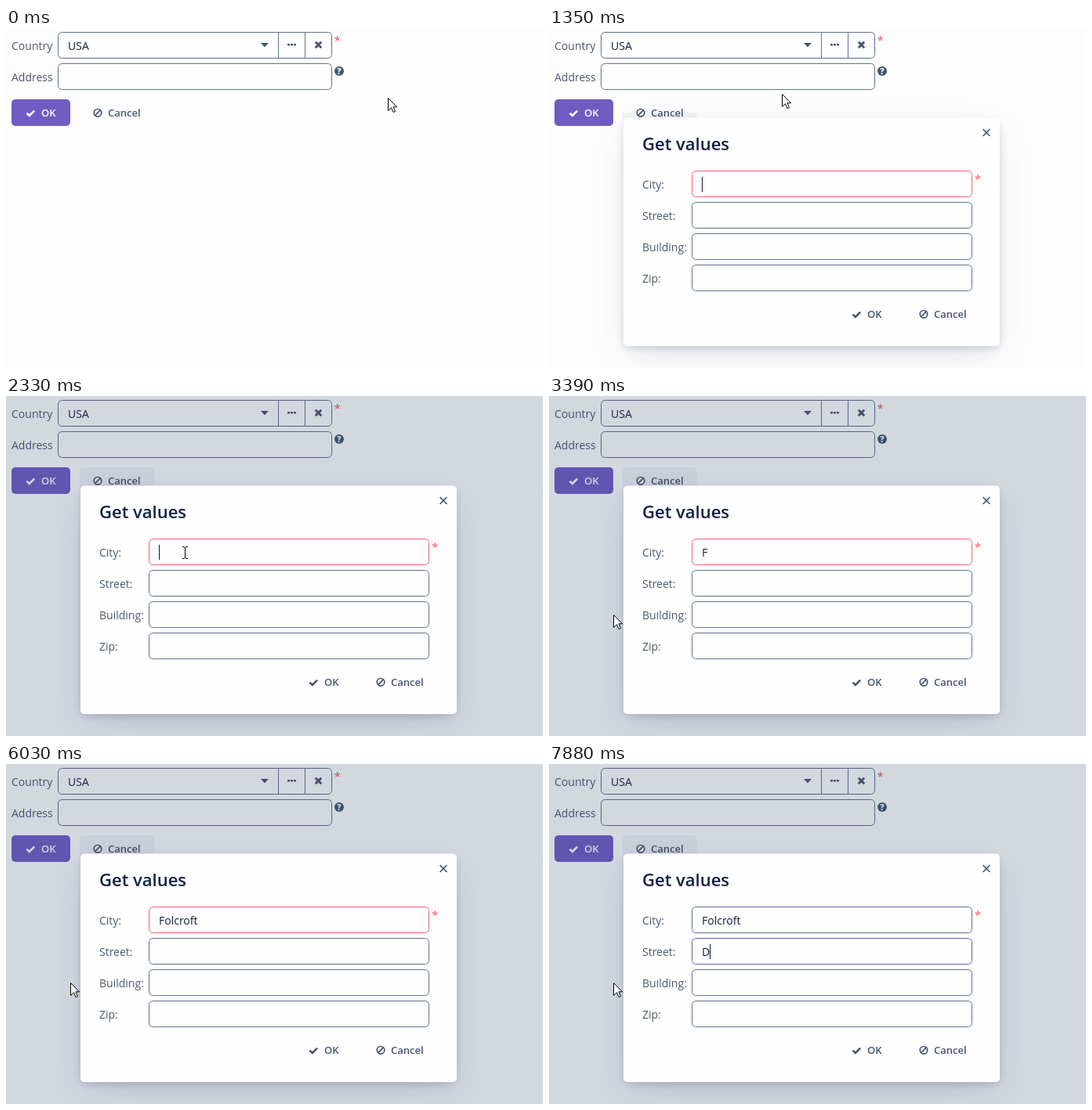
These frames come from a looping animation (685 px wide and 434 px high, 8 s). An HTML page with a canvas:

```html
<!DOCTYPE html>
<html lang="en">
<head>
<meta charset="utf-8">
<title>Address form</title>
<style>
  html, body { margin: 0; width: 100%; height: 100%; overflow: hidden; background: #fdfdfd; }
  canvas { display: block; }
</style>
</head>
<body>
<canvas id="stage" width="685" height="434"></canvas>
<script>
const ctx = document.getElementById('stage').getContext('2d');
const LOOP = 8000;
const FONT = '"Open Sans", sans-serif';
const PAPER = '#fdfdfd', LABEL = '#4b5872', INK = '#0d1c38', ICON = '#465472';
const BORDER = '#5f7091', ERROR = '#f8616d', ACCENT = '#6d58c2', STAR = '#ef5448';

// [time, x, y, shape]
const pointer = [
  [0, 487, 89, 'arrow'], [130, 482, 87, 'arrow'], [260, 467, 79, 'arrow'],
  [390, 449, 69, 'arrow'], [520, 434, 62, 'arrow'], [650, 421, 58, 'hand'],
  [1070, 419, 57, 'hand'], [1210, 326, 88, 'arrow'], [1350, 297, 84, 'arrow'],
  [1510, 260, 101, 'arrow'], [1650, 236, 154, 'arrow'], [1790, 228, 200, 'beam'],
  [2600, 168, 227, 'arrow'], [2730, 104, 266, 'arrow'], [2860, 82, 279, 'arrow']
];

// [time, city letters typed]
const cityTyping = [[0, 0], [3390, 1], [3660, 2], [4050, 3], [4580, 4],
  [5110, 5], [5500, 6], [5760, 7], [6030, 8]];

// The caret flips between hidden and shown at each of these times.
const caretFlips = [1350, 1790, 2330, 2860, 3660, 3920, 4050, 4450, 4580, 4980,
  5110, 5370, 5500, 6030, 6560, 7490, 7880];

const backdrop = [[0, 0], [1510, 0.155], [1650, 0.185], [1790, 0.193]];

function latest(steps, t) {
  let current = steps[0];
  for (const step of steps) if (step[0] <= t) current = step;
  return current;
}

function text(str, x, y, color = LABEL, size = 14, weight = 400) {
  ctx.font = `${weight} ${size}px ${FONT}`;
  ctx.fillStyle = color;
  ctx.fillText(str, x, y);
}

function box(x, y, w, h, r, fill) {
  ctx.beginPath();
  ctx.roundRect(x, y, w, h, r);
  ctx.fillStyle = fill;
  ctx.fill();
}

function line(points, color, width) {
  ctx.beginPath();
  points.forEach(([x, y]) => ctx.lineTo(x, y));
  ctx.strokeStyle = color;
  ctx.lineWidth = width;
  ctx.stroke();
}

function cross(x, y, r, color, width) {
  line([[x - r, y - r], [x + r, y + r]], color, width);
  line([[x - r, y + r], [x + r, y - r]], color, width);
}

function field(x, y, w, color = BORDER) {
  ctx.beginPath();
  ctx.roundRect(x + 0.5, y + 0.5, w - 1, 33, 5);
  ctx.fillStyle = '#fefefe';
  ctx.fill();
  ctx.strokeStyle = color;
  ctx.lineWidth = 1;
  ctx.stroke();
}

function check(x, y, color) {
  line([[x + 1, y + 4.7], [x + 4.3, y + 8], [x + 10.6, y + 1.7]], color, 2.6);
}

function ban(x, y) {
  ctx.beginPath();
  ctx.arc(x, y, 4.8, 0, Math.PI * 2);
  ctx.strokeStyle = ICON;
  ctx.lineWidth = 1.7;
  ctx.stroke();
  line([[x - 3.4, y + 3.4], [x + 3.4, y - 3.4]], ICON, 1.7);
}

function buttonText(str, x, y, color = ICON) {
  text(str, x, y, color, 13, 600);
}

function drawForm(t) {
  text('Country', 7, 28);
  field(66, 5, 350);
  text('USA', 79, 28, INK);
  line([[347.5, 6], [347.5, 38]], BORDER, 1);
  line([[381.5, 6], [381.5, 38]], BORDER, 1);
  ctx.fillStyle = ICON;
  ctx.beginPath();
  ctx.moveTo(325, 19);
  ctx.lineTo(335, 19);
  ctx.lineTo(330, 24.5);
  ctx.fill();
  for (const x of [359, 363, 367]) box(x, 20, 3, 2.5, 0.5, ICON);
  cross(398.5, 21.5, 3.7, ICON, 2.9);
  text('*', 418.5, 21, STAR, 15);

  text('Address', 7, 68);
  field(66, 45, 350);
  box(419, 49, 12, 12, 6, ICON);
  text('?', 422.2, 59, PAPER, 10.5, 800);

  box(7, 91, 75, 34, 5, '#705bc3');
  check(25.5, 104, '#fff');
  buttonText('OK', 45, 113, '#fff');

  if (t >= 1350) {
    const top = t < 1510 ? 108 : 91;
    box(94, top, 95, 125 - top, top === 91 ? 5 : 0, 'rgba(35,59,95,.045)');
  }
  ban(117, 108.3);
  buttonText('Cancel', 130, 113);
}

function shadow(inset, dy, blur, alpha) {
  ctx.save();
  ctx.shadowColor = `rgba(35,55,95,${alpha})`;
  ctx.shadowBlur = blur;
  ctx.shadowOffsetY = dy;
  box(95 + inset, 115 + inset, 480 - 2 * inset, 291 - 2 * inset, 5, '#fff');
  ctx.restore();
}

function drawDialog(t) {
  shadow(8, 16, 48, 0.13);
  shadow(2, 4, 12, 0.24);
  box(95, 114.5, 480, 291.5, 5, '#fefefe');
  text('Get values', 119, 156, '#0c2144', 22, 600);
  cross(558, 133.5, 4.4, ICON, 1.5);

  const onStreet = t >= 6960;
  const city = 'Folcroft'.slice(0, latest(cityTyping, t)[1]);
  const street = t >= 7880 ? 'D' : '';
  const rows = [
    ['City:', t < 7620 ? ERROR : BORDER, city],
    ['Street:', onStreet ? ACCENT : BORDER, street],
    ['Building:', BORDER, ''],
    ['Zip:', BORDER, '']
  ];
  rows.forEach(([name, color, value], i) => {
    const y = 182 + i * 40;
    text(name, 119, y + 23);
    field(182, y, 358, color);
    text(value, 195, y + 23, INK);
  });
  text('*', 543, 198, STAR, 15);

  const flips = caretFlips.filter(time => time <= t).length;
  if (flips % 2) {
    ctx.font = `400 14px ${FONT}`;
    const x = 195 + Math.floor(ctx.measureText(onStreet ? street : city).width);
    ctx.fillStyle = '#081630';
    ctx.fillRect(x, onStreet ? 230 : 190, 1, 19);
  }

  check(386.5, 361, ICON);
  buttonText('OK', 406, 370);
  ban(478, 365.3);
  buttonText('Cancel', 491, 370);
}

const shapes = {
  arrow: new Path2D('M.5 .5V16.5L4.5 12.8L7 18.5L9.5 17.5L7 11.8H11.5Z'),
  hand: new Path2D('M5.5 14V2.5Q5.5 .5 7 .5T8.5 2.5V8Q11.5 6.5 11.5 9' +
    'Q14.5 7.5 14.5 10Q17.5 9 17.5 11.5V16Q17.5 18 15.5 20V23H7.5V20' +
    'L1 13.5Q0 11.5 2 11Q3.5 11 5.5 14ZM8.5 8V12M11.5 9V12.5M14.5 10V13'),
  beam: new Path2D('M-3 -7.5H-1L.5 -6.5L2 -7.5H4M.5 -6.5V6.5M-3 7.5H-1L.5 6.5L2 7.5H4')
};

function drawPointer(t) {
  const [, x, y, shape] = latest(pointer, t);
  ctx.save();
  ctx.translate(x, y);
  if (shape !== 'beam') {
    ctx.fillStyle = '#fff';
    ctx.fill(shapes[shape]);
  }
  ctx.strokeStyle = '#000';
  ctx.lineWidth = 1;
  ctx.stroke(shapes[shape]);
  ctx.restore();
}

function render(t) {
  ctx.fillStyle = PAPER;
  ctx.fillRect(0, 0, 685, 434);
  drawForm(t);
  ctx.fillStyle = `rgba(35,59,95,${latest(backdrop, t)[1]})`;
  ctx.fillRect(0, 0, 685, 434);
  if (t >= 1350) drawDialog(t);
  drawPointer(t);
}

let start;
function tick(now) {
  start ??= now;
  render((now - start) % LOOP);
  requestAnimationFrame(tick);
}
render(0);
requestAnimationFrame(tick);
</script>
</body>
</html>
```
